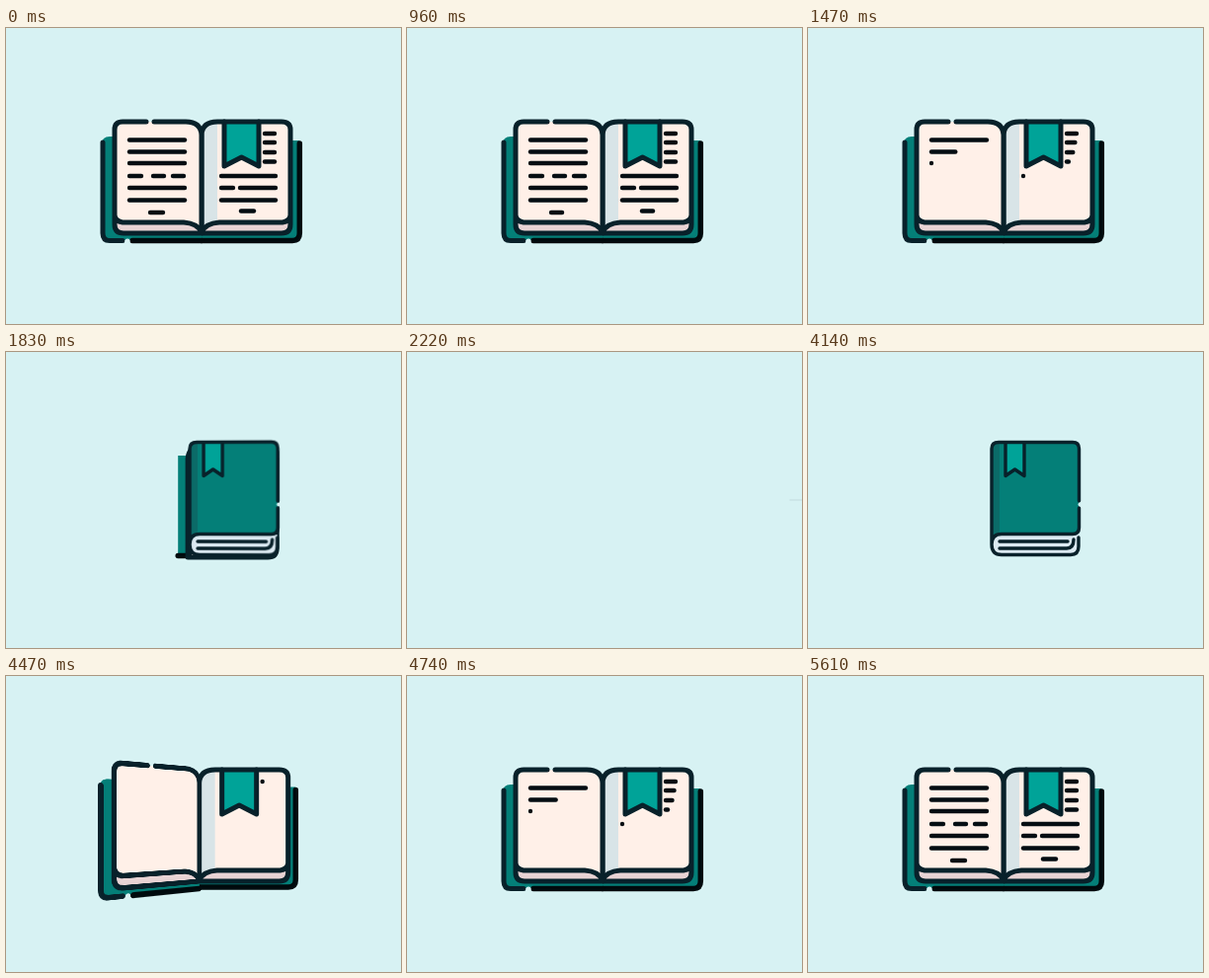
Write an HTML page that moves like this. It is 400x300 px and loops after 5.64 s.

```html
<!DOCTYPE html>
<html lang="en">
<head>
<meta charset="utf-8">
<title>Book</title>
<style>
  html, body { margin: 0; width: 100%; height: 100%; overflow: hidden; background: #d7f2f3; }
  #stage { position: relative; width: 400px; height: 300px; overflow: hidden; }
  #book, svg { position: absolute; left: 0; top: 0; width: 400px; height: 300px; overflow: visible; }
  svg { fill: none; stroke-linecap: round; stroke-linejoin: round; transform-origin: 198px 150px; }
  .ink { stroke: #08212a; stroke-width: 5; }
  .black { stroke: #000a0d; stroke-width: 5.5; }
  .text { stroke: #050d12; stroke-width: 4.4; }
  .teal { fill: #047f78; }
  .bright { fill: #00a398; }
  .page { fill: #fff0e8; }
  .edge { fill: #e8d3d4; }
  #cover { left: 14px; transform-origin: 184px 150px; }
  #cover .ink { stroke-width: 3.4; }
</style>
</head>
<body>
<div id="stage">
  <svg viewBox="0 0 400 300"><g id="streaks" class="ink"></g></svg>
  <div id="book">
    <svg id="right" viewBox="0 0 400 300">
      <g id="board">
        <path class="teal" d="M198 114H297V209Q297 215 290 215H198Z"/>
        <path class="black" d="M198 215.5H290Q297.3 215.5 297.3 208V117"/>
      </g>
      <path class="edge" d="M198 108Q199 95 214 95H279Q288 95 288 103V199Q288 208 279 208H198Z"/>
      <path class="page" d="M198 108Q199 95 214 95H279Q288 95 288 103V190Q287 196 280 197H216Q202 198 198 207Z"/>
      <path fill="#d8e4e7" d="M198 108Q199 95 214 95V197Q202 198 198 207Z"/>
      <path class="bright ink" d="M221 95V140L238.5 131L256 140V95"/>
      <path class="ink" d="M198 108Q199 95 214 95H279Q288 95 288 103V199Q288 208 279 208H198V108M288 190Q287 196 280 197H216Q202 198 198 207"/>
      <g class="text"></g>
    </svg>
    <svg id="left" viewBox="0 0 400 300">
      <path class="teal" d="M198 110H105Q97 110 97 118V209Q97 215 104 215H198Z"/>
      <path class="ink" d="M98 116V208Q98 215.5 105 215.5H118"/>
      <path class="black" d="M128 215.5H198"/>
      <circle cx="123" cy="216" r="2.6" fill="#d7f2f3"/>
      <path class="edge" d="M198 108Q197 95 182 95H118Q110 95 110 103V199Q110 208 119 208H198Z"/>
      <path class="page" d="M198 108Q197 95 182 95H118Q110 95 110 103V190Q111 196 118 197H180Q194 198 198 207Z"/>
      <path class="ink" d="M142 95H118Q110 95 110 103V199Q110 208 119 208H198M150 95H182Q197 95 198 108V208M110 190Q111 196 118 197H180Q194 198 198 207"/>
      <g class="text"></g>
    </svg>
    <svg id="cover" viewBox="0 0 400 300">
      <path fill="#dbe9f1" d="M186 195Q186 205.5 196 205.5H266Q274 205.5 274 197V185H196Q186 185 186 195Z"/>
      <path class="teal" d="M186 195V98Q186 91.5 193 91.5H268Q274.5 91.5 274.5 98V178Q274.5 184.5 268 184.5H196Q186 184.5 186 195Z"/>
      <path fill="#0b6b68" d="M187 190V93H194V185Q189 186 187 190Z"/>
      <path class="bright ink" d="M200 92V125.5L209.5 119L219 125.5V92"/>
      <path class="ink" d="M274.5 151V98Q274.5 91.5 268 91.5H193Q186 91.5 186 98V195Q186 205.5 196 205.5H266Q274 205.5 274 197V188M274.5 158V178Q274.5 184.5 268 184.5H196Q186 184.5 186 195M194 192H263M194 199H262Q269 199 269 190"/>
      <circle cx="275.5" cy="154.5" r="2" fill="#d7f2f3"/>
    </svg>
  </div>
</div>
<script>
const LOOP = 5640, WRITE = 280;
const $ = s => document.querySelector(s);
const clamp = v => Math.max(0, Math.min(1, v));
const ramp = (t, a, b) => clamp((t - a) / (b - a));
const inOut = p => p < .5 ? 4 * p ** 3 : 1 - 4 * (1 - p) ** 3;

// Rows of text: y, time at which writing starts, then start and end of each dash
const rows = {
  left: [
    [113.5, 4475, 125, 181], [125.5, 4605, 125, 181], [137, 4735, 125, 181],
    [150, 4885, 125, 137, 149, 160, 169, 180], [162, 5035, 125, 181],
    [174.5, 5185, 125, 181], [187, 5335, 146, 159]
  ],
  right: [
    [107, 4460, 262, 272], [116, 4554, 262, 272], [126, 4585, 262, 272], [135.5, 4637, 262, 272],
    [150, 4735, 218, 273], [162, 4935, 218, 230, 237, 273],
    [174.5, 5135, 218, 273], [185.5, 5335, 238, 251]
  ]
};

function addLine(parent, y) {
  const el = document.createElementNS('http://www.w3.org/2000/svg', 'line');
  el.setAttribute('y1', y);
  el.setAttribute('y2', y);
  return parent.appendChild(el);
}
function setLine(el, x1, x2, visible) {
  el.setAttribute('x1', x1);
  el.setAttribute('x2', x2);
  el.style.display = visible ? '' : 'none';
}

const dashes = [];
for (const side in rows) for (const [y, start, ...xs] of rows[side])
  for (let i = 0; i < xs.length; i += 2)
    dashes.push({ el: addLine($(`#${side} .text`), y), start, from: xs[0], to: xs.at(-1), a: xs[i], b: xs[i + 1] });

const streaks = [[122, 16], [150, 38], [177, 16]].map(([y, gap]) => ({ el: addLine($('#streaks'), y), gap }));

function drawText(t) {
  const pen = t < 3000 ? 4740 + (1470 - t) * 1.535 : t;
  for (const d of dashes) {
    const p = inOut(clamp((pen - d.start) / WRITE));
    const x = d.from + (d.to - d.from) * p;
    setLine(d.el, d.a, Math.min(x, d.b), p > 0 && x >= d.a);
  }
}

// Offset of the closed book from its resting place
function slide(t) {
  if (t < 1920) return 0;
  if (t < 3000) return .00247 * (t - 1920) ** 2;
  if (t < 4040) {
    const p = ramp(t, 3755, 4040);
    return -290 + 310 * (1 - (1 - p) ** 2 * (1 + 2 * p));
  }
  const back = ramp(t, 4040, 4140);
  return 20 * (1 - back * back * (3 - 2 * back));
}

function drawStreaks(t, dx, speed) {
  const gone = t >= 2220 && t < 3810;
  streaks.forEach(({ el, gap }, i) => {
    const end = 184 + dx - gap;
    const moving = (dx > 45 || dx < -5) && speed > .3;
    if (gone) setLine(el, 388, 401, i === 1);
    else setLine(el, end - speed * 8, end, moving);
  });
  $('#streaks').style.strokeWidth = gone ? 1.5 : 2.5;
  $('#streaks').style.opacity = gone ? .07 : Math.min(.35, speed * .2);
}

function draw(t) {
  const open = t < 3000 ? 1 - inOut(ramp(t, 1500, 1880)) : inOut(ramp(t, 4190, 4620));
  const angle = open * 180;
  const dx = slide(t);
  const speed = Math.abs(slide(t + 2) - slide(t - 2)) / 4;
  const book = $('#book').style;
  book.display = t >= 2220 && t < 3800 ? 'none' : '';
  book.transform = `translateX(${dx - 14 * (1 - open)}px)`;
  book.filter = open === 0 && speed > .4 ? `blur(${Math.min(1.8, speed)}px)` : 'none';

  const turn = (id, deg, shown) => {
    $(id).style.display = shown ? '' : 'none';
    $(id).style.transform = deg ? `perspective(380px) rotateY(${deg}deg)` : 'none';
  };
  turn('#cover', -angle, angle < 90);
  turn('#left', 180 - angle, angle >= 90);
  turn('#right', 0, angle > 0);
  $('#board').setAttribute('transform', `translate(${-10 * (1 - open)} ${-9 * (1 - open)})`);

  drawText(t);
  drawStreaks(t, dx, speed);
}

const begin = performance.now();
function frame() {
  draw((performance.now() - begin) % LOOP);
  requestAnimationFrame(frame);
}
frame();
</script>
</body>
</html>
```
